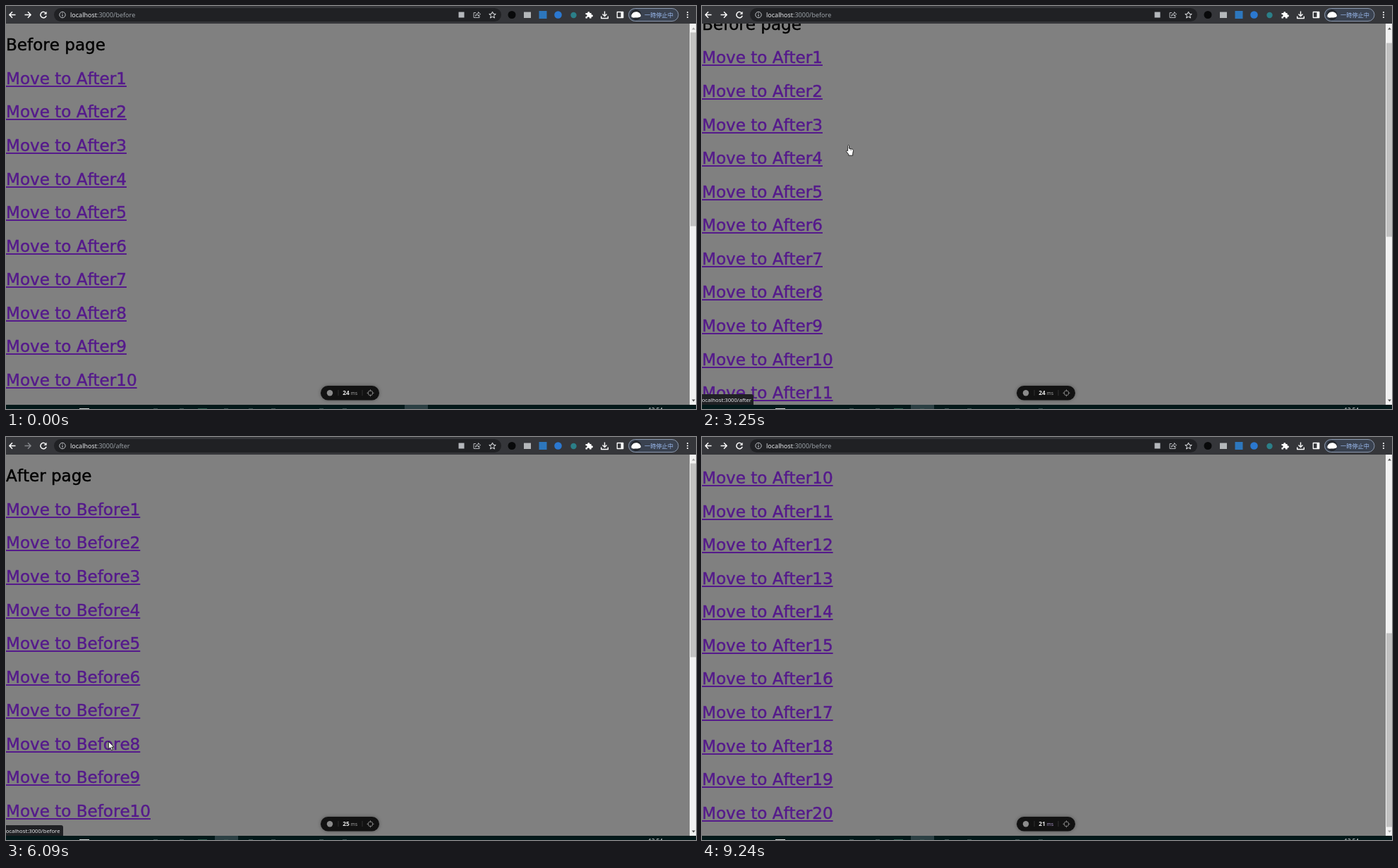
Animation of 978 by 572 pixels, one loop 9.94 s. Source, as an HTML page with a canvas:

```html
<!DOCTYPE html>
<html lang="en">
<head>
<meta charset="utf-8">
<title>Scroll position between pages</title>
<style>
html, body { margin: 0; width: 100%; height: 100%; overflow: hidden; background: #808080; }
canvas { display: block; width: 978px; height: 572px; }
</style>
</head>
<body>
<canvas id="stage" width="978" height="572"></canvas>
<script>
const ctx = document.getElementById('stage').getContext('2d');
const LOOP = 9940, W = 978;
const VIEW_TOP = 25, VIEW_BOTTOM = 566, MAX_SCROLL = 473;
const UI = '"Noto Sans", "Open Sans", sans-serif';
const PAGE_FONT = '23.07px "DejaVu Sans", sans-serif';

// Cursor moves: start, end, number of poses, first pose, last pose, easing power
const MOVES = [
  [560, 910, 5, [718, 544], [300, 195], 1],
  [1400, 1750, 7, [299, 178], [273, 47], 1],
  [2700, 2900, 4, [264, 70], [204, 197], 1],
  [4200, 4550, 6, [201, 225], [163, 542], 1],
  [4600, 4950, 6, [163, 544], [160, 549], 1],
  [6090, 7040, 14, [145, 432], [9, 17], 2],
  [7140, 7140, 1, [8, 16], [8, 16], 1],
  [8190, 8265, 2, [95, 85], [257, 224], 1],
  [8890, 9200, 4, [943, 555], [943, 568], 1]
];

// Progress 0..1 that jumps through n evenly timed poses
function poses(t, start, end, n) {
  if (n < 2) return 1;
  return Math.min(n - 1, Math.floor((t - start) / (end - start) * (n - 1) + 1e-6)) / (n - 1);
}

function cursorAt(t) {
  if (t < 560 || (t >= 8340 && t < 8890) || t >= 9240) return null;
  const [start, end, n, a, b, power] = MOVES.filter(m => m[0] <= t).pop();
  const p = 1 - Math.pow(1 - poses(t, start, end, n), power);
  return { x: a[0] + (b[0] - a[0]) * p, y: a[1] + (b[1] - a[1]) * p };
}

function scrollAt(t) {
  if (t >= 5400 && t < 7590) return 0;
  if (t < 3100) return 0;
  if (t < 3250) return 9;
  return 29.5 + (MAX_SCROLL - 29.5) * poses(t, 3250, 3750, 6);
}

function statusAt(t) {
  if (t >= 1110 && t < 1900) return ['after', t < 1750 ? 1 : 0.45];
  if (t >= 3100 && t < 5400) return ['after', 1];
  if (t >= 6090 && t < 6900) return ['before', t < 6820 ? 1 : 0.45];
  return null;
}

function rect(x, y, w, h, color) {
  ctx.fillStyle = color;
  ctx.fillRect(x, y, w, h);
}

function round(x, y, w, h, r, fill, stroke) {
  ctx.beginPath();
  ctx.roundRect(x, y, w, h, r);
  if (fill) { ctx.fillStyle = fill; ctx.fill(); }
  if (stroke) { ctx.strokeStyle = stroke; ctx.lineWidth = 1; ctx.stroke(); }
}

function disc(x, y, r, color) {
  ctx.beginPath();
  ctx.arc(x, y, r, 0, 7);
  ctx.fillStyle = color;
  ctx.fill();
}

function ring(x, y, r, color, width = 1) {
  ctx.beginPath();
  ctx.arc(x, y, r, 0, 7);
  ctx.strokeStyle = color;
  ctx.lineWidth = width;
  ctx.stroke();
}

function path(d, x, y, stroke, width, fill) {
  const p = new Path2D(d);
  ctx.save();
  ctx.translate(x, y);
  ctx.lineJoin = 'round';
  if (fill) { ctx.fillStyle = fill; ctx.fill(p); }
  if (stroke) { ctx.strokeStyle = stroke; ctx.lineWidth = width; ctx.stroke(p); }
  ctx.restore();
}

function text(s, x, y, font, color) {
  ctx.font = font;
  ctx.fillStyle = color;
  ctx.fillText(s, x, y);
  return ctx.measureText(s).width;
}

function pageLine(s, y, color, underline) {
  const w = text(s, 0, y, PAGE_FONT, color);
  ctx.strokeStyle = color;
  ctx.lineWidth = 0.45;
  ctx.lineJoin = 'round';
  ctx.strokeText(s, 0, y);
  if (underline) rect(0, Math.round(y + 2), w, 2, color);
}

function drawPage(name, scroll) {
  const other = name === 'Before' ? 'After' : 'Before';
  ctx.save();
  ctx.beginPath();
  ctx.rect(0, VIEW_TOP, W, VIEW_BOTTOM - VIEW_TOP);
  ctx.clip();
  rect(0, VIEW_TOP, W, VIEW_BOTTOM - VIEW_TOP, '#808080');
  for (let i = 0; i <= 20; i++) {
    const y = Math.round(63.3 + 47.57 * i - scroll);
    if (i) pageLine('Move to ' + other + i, y, '#551a8b', true);
    else pageLine(name + ' page', y, '#000', false);
  }
  ctx.restore();
}

function drawScrollbar(scroll) {
  rect(969, VIEW_TOP, 9, VIEW_BOTTOM - VIEW_TOP, '#f1f1f1');
  rect(970, 37.5 + scroll * 0.5095, 8, 275, '#c1c1c1');
  path('M-2.5 1.5L0 -1.5L2.5 1.5Z', 974.5, 32, null, 0, scroll ? '#505050' : '#a3a3a3');
  path('M-2.5 -1.5L0 1.5L2.5 -1.5Z', 974.5, 560, null, 0, scroll < MAX_SCROLL ? '#505050' : '#a3a3a3');
}

function drawToolbar(name, hoverBack) {
  const light = '#e8eaed', soft = '#c4c7cb';
  rect(0, 0, W, VIEW_TOP, '#35363a');
  if (hoverBack) disc(9, 12.5, 9.5, '#4b4c50');
  const arrow = 'M4.5 0H-4M0 -4.2L-4.2 0L0 4.2';
  path(arrow, 9, 12.5, '#fff', 1.5);
  path('M-4.5 0H4M0 -4.2L4.2 0L0 4.2', 31, 12.5, name === 'Before' ? '#fff' : '#86888c', 1.4);
  path('M3.6 -2.2A4.2 4.2 0 1 0 4.1 1.2', 53, 12.5, '#fff', 1.5);
  path('M4.6 -4.8V-0.8H0.6Z', 53, 12.5, null, 0, '#fff');

  round(68, 3, 634, 19, 9.5, '#202124');
  ring(80, 12.5, 4.2, soft);
  rect(79.5, 11.8, 1, 3.2, soft);
  rect(79.5, 9.8, 1, 1.1, soft);
  const host = text('localhost', 91, 16, '9px ' + UI, light);
  text(':3000/' + name.toLowerCase(), 91 + host, 16, '9px ' + UI, '#9aa0a6');

  rect(641.5, 8.5, 8, 8, '#b4b7bb');
  path('M-1.5 -3H-4.5V4H3.5V1.5M-2 2C-2 -1 0 -2 2 -2V-4L5 -1L2 2V0C0 0 -1 0.5 -2 2Z', 667.5, 12.5, soft, 0.9);
  let star = '';
  for (let i = 0; i < 10; i++) {
    const a = Math.PI * (i / 5 - 0.5), r = i % 2 ? 2.2 : 5;
    star += (i ? 'L' : 'M') + r * Math.cos(a) + ' ' + r * Math.sin(a);
  }
  path(star + 'Z', 689.5, 13, light, 1);

  disc(717, 12.5, 5.5, '#08090a');
  rect(734, 8.5, 10, 8.5, '#b5b8bb');
  rect(755.5, 7, 11, 11, '#2d77bd');
  disc(782.5, 12.5, 5.3, '#2b78d0');
  disc(804.5, 13, 4.2, '#2b7f88');
  path('M-4.5 -2.7H-1.7A1.6 1.6 0 1 1 1.3 -2.7H3.6V-0.3A1.6 1.6 0 1 1 3.6 2.6V4.8H0.9A1.5 1.5 0 1 0 -1.9 4.8H-4.5V2.1A1.5 1.5 0 1 0 -4.5 -0.6Z', 826, 12.8, null, 0, '#fff');
  path('M0 -5V1.8M-3 -1L0 2L3 -1M-4.8 2V5H4.8V2', 848.5, 12.5, '#fff', 1.4);
  path('M-4.2 -4H4.2V4H-4.2Z', 870.5, 12.5, '#fff', 1.3);
  rect(871.5, 8.5, 3.5, 8, '#fff');

  round(882.5, 3.5, 70.5, 18, 9, '#3a4250', '#8c9ab0');
  disc(893, 12.5, 7.4, '#24282e');
  path('M-6.6 2.6C-7.2 -0.8 -3.8 -4.3 0 -4.2C4 -4.3 6.8 -1.5 6.9 1.5C6.4 4 3 3.8 0 4C-3 4.2 -6 4.6 -6.6 2.6Z', 893, 12.5, null, 0, '#fff');
  text('一時停止中', 905, 15.8, '8.2px "Noto Sans CJK JP", "Noto Sans CJK", sans-serif', '#9dbdf2');
  for (const y of [9, 12.5, 16]) disc(966, y, 1.1, '#fff');
}

function drawBadge(t) {
  const ms = t < 5400 ? 24 : t < 7690 ? 25 : 21;
  ctx.save();
  ctx.shadowColor = 'rgba(0,0,0,.35)';
  ctx.shadowBlur = 5;
  round(446, 539, 83, 20.5, 10.25, '#121212');
  ctx.restore();
  disc(459, 549.3, 4.2, '#8b8b8b');
  rect(470.5, 545, 1, 8, '#303030');
  rect(504.5, 545, 1, 8, '#303030');
  text(ms, 477.3, 552.3, '600 8.4px ' + UI, '#e4e4e4');
  text('ms', 488.8, 552, '6.5px ' + UI, ms === 21 ? '#ab96c8' : '#a4a4a4');
  ring(516.5, 549.3, 3.4, '#898989', 0.9);
  path('M0 -5V-2.2M0 2.2V5M-5 0H-2.2M2.2 0H5', 516.5, 549.3, '#898989', 0.9);
}

function drawStatus([name, alpha]) {
  ctx.save();
  ctx.globalAlpha = alpha;
  const w = name === 'after' ? 73 : 81;
  round(-2, 551, w + 2, 15, [0, 3, 0, 0], '#202124');
  text('localhost:3000/' + name, -2.3, 561.8, '7.7px ' + UI, '#e8eaed');
  ctx.restore();
}

function drawTaskbar(t) {
  rect(0, VIEW_BOTTOM, W, 6, '#03191a');
  rect(t < 2200 ? 565 : 296, VIEW_BOTTOM, 33, 6, '#2c4044');
  rect(104, 571, 14, 1, '#d5dbdb');
  for (const x of [209, 246, 309, 344, 376, 444, 477]) rect(x, 571, 6, 1, '#38504f');
  rect(272, 571, 13, 1, '#2a5a4c');
  text('12:54', 910.5, 576.5, '8px ' + UI, '#e6eaea');
}

function drawCursor({ x, y }, hand) {
  x = Math.round(x);
  y = Math.round(y);
  if (hand) {
    path('M2.6 1.6C2.6 0.2 4.6 0.2 4.6 1.6V5.2L8.8 6.1C10.2 6.4 10.7 7.2 10.5 8.6L9.7 12.5V15.2H3.8V13.6L0.6 9.6C0 8.4 1.3 7.6 2.6 8.8Z', x, y, '#111', 0.9, '#fff');
    path('M6.2 6V8.4M8.2 6.4V8.6', x, y, '#333', 0.5);
  } else {
    path('M0.4 0.4V11L2.8 8.8L4.6 12.8L6.4 12L4.7 8.1H8Z', x, y, '#111', 0.8, '#fff');
  }
}

function draw(t) {
  const name = t >= 5400 && t < 7590 ? 'After' : 'Before';
  const scroll = scrollAt(t), status = statusAt(t), cursor = cursorAt(t);
  drawPage(name, scroll);
  drawScrollbar(scroll);
  drawBadge(t);
  if (status) drawStatus(status);
  drawToolbar(name, t >= 6960 && t < 8190);
  drawTaskbar(t);
  if (cursor) drawCursor(cursor, t >= 860 && t < 5400 && cursor.y > 87);
}

ctx.fontKerning = 'none';
const began = performance.now();
function frame() {
  draw((performance.now() - began) % LOOP);
  requestAnimationFrame(frame);
}
frame();
</script>
</body>
</html>
```
